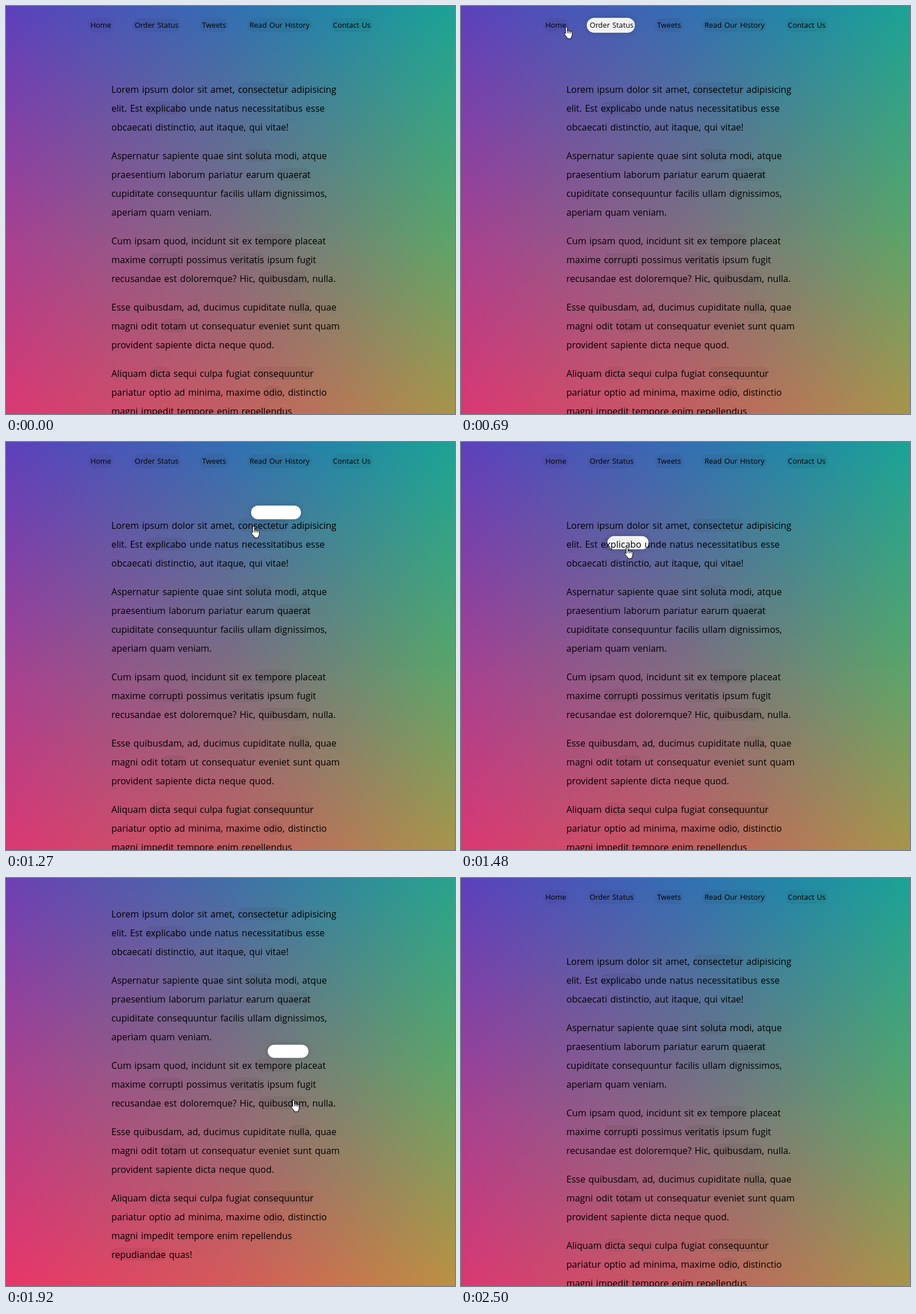
An HTML page that plays this animation: 784 px wide and 714 px high, repeating every 2520 ms.

```html
<!DOCTYPE html>
<html lang="en">
<head>
<meta charset="utf-8">
<title>Follow along links</title>
<style>
  html, body { margin: 0; width: 100%; height: 100%; overflow: hidden; }
  body { position: relative; color: #000; font-family: "Open Sans", "Noto Sans", sans-serif; }
  #page { position: absolute; left: 0; top: 0; width: 784px; height: 797px; }

  /* Three colour rows, blended downwards by masks */
  .row { position: absolute; inset: 0; }
  .bottom { background: linear-gradient(90deg, rgb(233,54,106), rgb(214,90,89) 50%, rgb(188,145,67)); }
  .middle {
    background: linear-gradient(90deg, rgb(165,65,146), rgb(127,109,129) 50%, rgb(90,165,105));
    -webkit-mask: linear-gradient(#000 50%, transparent);
    mask: linear-gradient(#000 50%, transparent);
  }
  .top {
    background: linear-gradient(90deg, rgb(92,64,188), rgb(50,111,178) 50%, rgb(34,134,168) 72%, rgb(27,163,149));
    -webkit-mask: linear-gradient(#000, transparent 50%);
    mask: linear-gradient(#000, transparent 50%);
  }

  a { background: rgba(0,0,0,.05); border-radius: 20px; }
  nav {
    position: absolute; left: 0; top: 20.8px; width: 100%;
    display: flex; justify-content: center; gap: 33px;
    font-size: 12.8px; line-height: 25.6px; word-spacing: 1.1px; white-space: nowrap;
  }
  nav a { padding: 0 4px; }
  main {
    position: absolute; left: 184px; top: 130.2px;
    font-size: 16px; line-height: 33.1px; word-spacing: 1.3px; white-space: nowrap;
  }
  main a { padding-top: 1px; }
  p { margin: 0 0 16.55px; }
  #pill {
    position: absolute; left: 0; top: 0; background: #fff;
    border-radius: 20px; box-shadow: 0 0 10px rgba(0,0,0,.2);
  }
  #cursor { position: absolute; left: 0; top: 0; overflow: visible; }
  #cursor path { fill: #fff; stroke: #000; stroke-linejoin: round; stroke-linecap: round; }
</style>
</head>
<body>
<div id="page">
  <div class="row bottom"></div>
  <div class="row middle"></div>
  <div class="row top"></div>
  <div id="pill"></div>
  <nav>
    <a>Home</a>
    <a>Order Status</a>
    <a>Tweets</a>
    <a>Read Our History</a>
    <a>Contact Us</a>
  </nav>
  <main>
    <p>Lorem ipsum dolor sit amet, <a>consectetur</a> adipisicing<br>
      elit. Est <a>explicabo</a> unde natus necessitatibus esse<br>
      obcaecati distinctio, aut itaque, qui vitae!</p>
    <p>Aspernatur sapiente quae sint <a>soluta</a> modi, atque<br>
      praesentium laborum pariatur earum <a>quaerat</a><br>
      cupiditate consequuntur facilis ullam dignissimos,<br>
      aperiam quam veniam.</p>
    <p>Cum ipsam quod, incidunt sit ex <a>tempore</a> placeat<br>
      maxime <a>corrupti</a> possimus <a>veritatis</a> ipsum fugit<br>
      recusandae est doloremque? Hic, <a>quibusdam</a>, nulla.</p>
    <p>Esse quibusdam, ad, ducimus cupiditate <a>nulla</a>, quae<br>
      magni odit <a>totam</a> ut consequatur eveniet sunt quam<br>
      provident sapiente dicta neque quod.</p>
    <p>Aliquam <a>dicta</a> sequi culpa fugiat <a>consequuntur</a><br>
      pariatur optio ad minima, maxime <a>odio</a>, distinctio<br>
      magni impedit tempore enim repellendus<br>
      <a>repudiandae</a> quas!</p>
  </main>
</div>
<svg id="cursor" width="20" height="24">
  <path id="arrow" d="M0 0V15.5L3.6 12.2 6.2 18 8.6 17 6 11.3H11Z"/>
  <g id="hand">
    <path d="M-1.6 11V1.4a1.6 1.6 0 0 1 3.2 0V7a1.5 1.5 0 0 1 2.8 .4 1.5 1.5 0 0 1 2.8 .6 1.5 1.5 0 0 1 2.7 1.2V14q0 2-1.6 4v2H1.2V18.4L-3.6 12.4q-.9-1.6 .3-2.3 .9-.4 1.7 .9Z"/>
    <path d="M1.6 7V10.2M4.4 7.6V10.4M7.2 8.2V10.6"/>
  </g>
</svg>
<script>
  const LOOP = 2520, MOVE = 200, SHOW = 410, HIDE = 2470, SCROLL = 83;
  const byId = id => document.getElementById(id);
  const page = byId('page'), pill = byId('pill'), cursor = byId('cursor');
  const arrow = byId('arrow'), hand = byId('hand');

  // Turning points of the pointer: time, x, y
  const path = [
    [SHOW, 628, 140], [490, 300, 40], [690, 185, 37], [715, 165, 38],
    [790, 345, 37], [945, 395, 37], [1090, 566, 38], [1120, 672, 40],
    [1175, 480, 143], [1320, 408, 150], [1346, 312, 176], [1480, 290, 184],
    [1500, 290, 184], [1518, 420, 258], [1632, 471, 288], [1730, 483, 294],
    [1800, 502, 389], [2110, 502, 389], [2330, 548, 540], [LOOP, 548, 540]
  ];

  const clamp = v => Math.min(1, Math.max(0, v));
  const mix = (a, b, p) => a + (b - a) * p;
  const smooth = v => (v = clamp(v)) * v * (3 - 2 * v);

  // The CSS "ease" curve, cubic-bezier(.25, .1, .25, 1)
  function ease(x) {
    if (x <= 0 || x >= 1) return clamp(x);
    const curve = (a, b, s) => 3 * a * s * (1 - s) ** 2 + 3 * b * s * s * (1 - s) + s ** 3;
    let lo = 0, hi = 1;
    for (let i = 0; i < 20; i++) {
      const mid = (lo + hi) / 2;
      if (curve(.25, .25, mid) < x) lo = mid; else hi = mid;
    }
    return curve(.1, 1, lo);
  }

  const scrollAt = t => Math.round(SCROLL * (smooth((t - 1770) / 110) - smooth((t - 2200) / 130)));

  function cursorAt(t) {
    const i = Math.max(0, path.findIndex(point => point[0] > t) - 1);
    const [from, x, y] = path[i], [to, nextX, nextY] = path[i + 1];
    const p = clamp((t - from) / (to - from));
    return [mix(x, nextX, p), mix(y, nextY, p)];
  }

  const links = [...document.querySelectorAll('a')].map(a => {
    const { x, y, width, height } = a.getBoundingClientRect();
    return [x, y, width, height];
  });

  function linkAt(t) {
    const [cx, cy] = cursorAt(t), py = cy + scrollAt(t);
    return links.find(([x, y, w, h]) => cx >= x && cx <= x + w && py >= y && py <= y + h);
  }

  // Follow the pointer once to learn when it enters each link
  const enters = [];
  for (let t = SHOW, last; t < HIDE; t++) {
    const link = linkAt(t);
    if (link && link !== last) enters.push([t, link]);
    last = link;
  }

  // Each move starts from wherever the previous one was interrupted
  function pillAt(t) {
    let box = [0, 0, 0, 0];
    enters.forEach(([start, link], i) => {
      if (t < start) return;
      const end = i + 1 < enters.length ? Math.min(t, enters[i + 1][0]) : t;
      const p = ease((end - start) / MOVE);
      box = box.map((v, k) => mix(v, link[k], p));
    });
    return box;
  }

  function draw(t) {
    page.style.top = -scrollAt(t) + 'px';

    const [x, y, w, h] = pillAt(t);
    pill.style.visibility = w > 0 && t < HIDE ? 'visible' : 'hidden';
    pill.style.transform = `translate(${x}px, ${y}px)`;
    pill.style.width = w + 'px';
    pill.style.height = h + 'px';

    const [cx, cy] = cursorAt(t), over = linkAt(t);
    cursor.style.visibility = t >= SHOW && t < HIDE ? 'visible' : 'hidden';
    cursor.style.transform = `translate(${cx}px, ${cy}px)`;
    hand.style.display = over ? '' : 'none';
    arrow.style.display = over ? 'none' : '';
  }

  const begin = performance.now();
  function tick() {
    draw((performance.now() - begin) % LOOP);
    requestAnimationFrame(tick);
  }
  tick();
</script>
</body>
</html>
```
